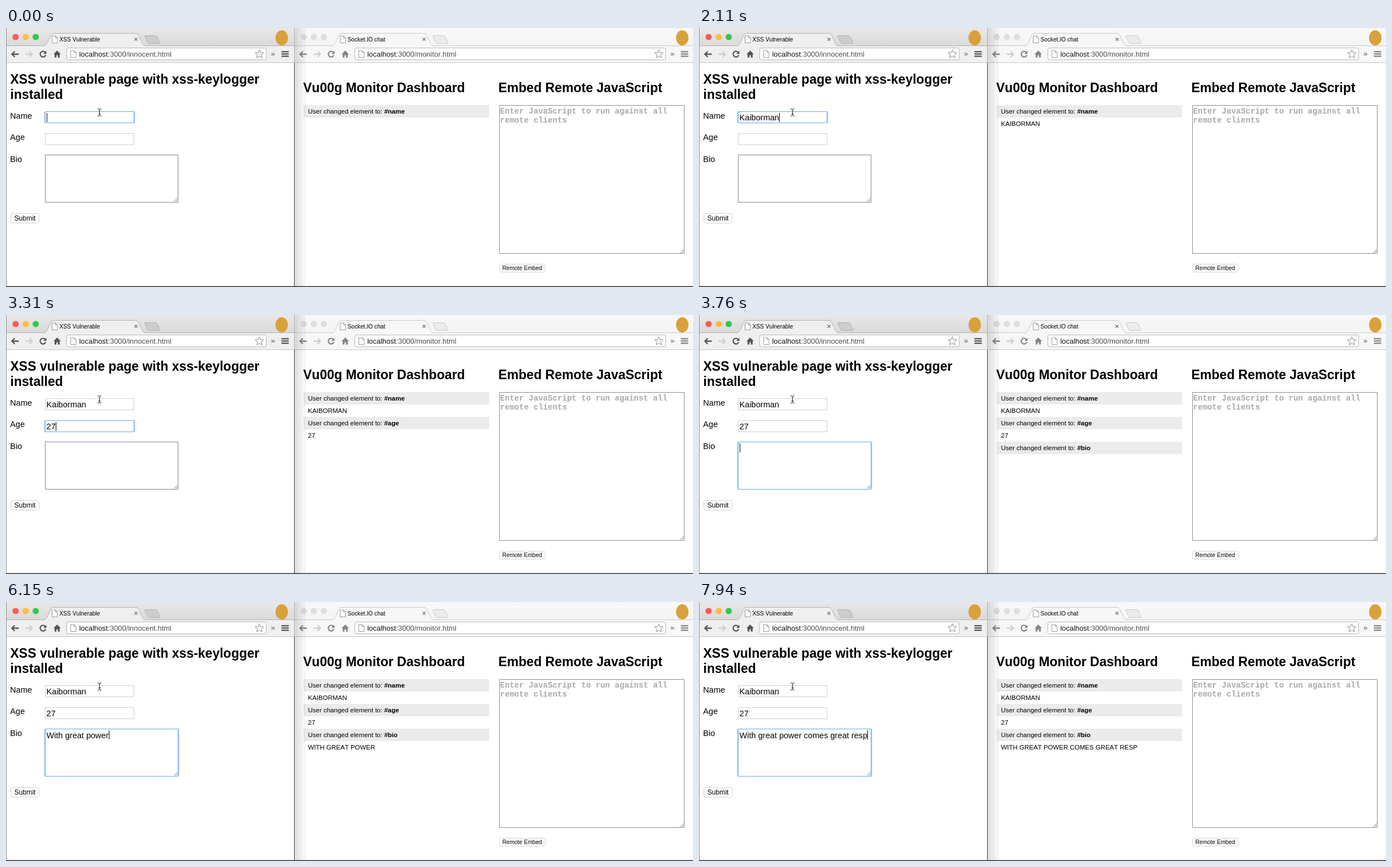
An HTML page with a canvas that plays this animation: 1216x460 px, repeating every 8000 ms.

```html
<!DOCTYPE html>
<html lang="en">
<head>
<meta charset="utf-8">
<title>Keylogger demo</title>
<style>
  html, body { margin: 0; width: 100%; height: 100%; overflow: hidden; background: #fff; }
  canvas { display: block; }
</style>
</head>
<body>
<canvas id="stage" width="1216" height="460"></canvas>
<script>
const ctx = document.getElementById('stage').getContext('2d');
const SANS = "'Liberation Sans', Arial, sans-serif";
const MONO = "'Liberation Mono', 'Courier New', monospace";
const LOOP = 8000;

const fields = [
  { id: 'name', label: 'Name', value: 'Kaiborman', x: 69.5, y: 148.5, w: 157, h: 20 },
  { id: 'age', label: 'Age', value: '27', x: 69.5, y: 187.5, w: 157, h: 20 },
  { id: 'bio', label: 'Bio', value: 'With great power comes great resp', x: 69.5, y: 225.5, w: 235, h: 84 },
];

// Typing script per field: [time, letters typed]; -1 means empty with the caret hidden.
const script = [
  [[0, 0], [150, -1], [780, 1], [930, 2], [1080, 3], [1230, 4], [1380, 5], [1530, 6], [1680, 7], [1820, 8], [2110, 9]],
  [[2260, 0], [2860, -1], [3310, 2]],
  [[3760, 0], [4360, -1], [4510, 1], [4660, 2], [4810, 3], [4960, 4], [5110, 5], [5260, 7],
   [5410, 9], [5560, 11], [5700, 12], [5850, 14], [6150, 16], [6300, 17], [6450, 19], [6600, 20],
   [6750, 22], [6890, 23], [7040, 25], [7190, 26], [7340, 28], [7490, 29], [7640, 31], [7940, 33]],
];

function text(str, x, y, size, color = '#000', weight = '', family = SANS) {
  ctx.font = `${weight} ${size}px ${family}`;
  ctx.fillStyle = color;
  ctx.fillText(str, x, y);
  return x + ctx.measureText(str).width;
}

function rect(x, y, w, h, color) {
  ctx.fillStyle = color;
  ctx.fillRect(x, y, w, h);
}

function paint(fill, stroke, width = 1) {
  if (fill) { ctx.fillStyle = fill; ctx.fill(); }
  if (stroke) { ctx.strokeStyle = stroke; ctx.lineWidth = width; ctx.stroke(); }
}

function box(x, y, w, h, r, fill, stroke, width) {
  ctx.beginPath();
  ctx.roundRect(x, y, w, h, r);
  paint(fill, stroke, width);
}

function shape(d, x, y, fill, stroke, width = 1) {
  ctx.save();
  ctx.translate(x, y);
  const path = new Path2D(d);
  if (fill) { ctx.fillStyle = fill; ctx.fill(path); }
  if (stroke) { ctx.strokeStyle = stroke; ctx.lineWidth = width; ctx.stroke(path); }
  ctx.restore();
}

function oval(x, y, rx, ry, fill) {
  ctx.beginPath();
  ctx.ellipse(x, y, rx, ry, 0, 0, 7);
  paint(fill);
}

function pageIcon(x, y) {
  shape('M-4.5-6H1.5L5-2.5V6.5H-4.5ZM1.5-6V-2.5H5', x, y, '#fff', '#999');
}

function star(x, y) {
  ctx.beginPath();
  for (let i = 0; i < 10; i++) {
    const r = i % 2 ? 3.6 : 8, a = (i * Math.PI) / 5;
    ctx.lineTo(x + r * Math.sin(a), y - r * Math.cos(a));
  }
  ctx.closePath();
  paint('#fff', '#888');
}

function grip(x, y) {
  shape('M-6 0L0-6M-3 0L0-3', x, y, null, '#777');
}

function browser(left, right, { strip, bar, newTab, edge, ink, lights, title, path, avatar }) {
  const shade = ctx.createLinearGradient(0, 0, 0, 31);
  strip.forEach((color, i) => shade.addColorStop(i, color));
  rect(left, 0, right - left, 460, '#fff');
  rect(left, 0, right - left, 31, shade);
  rect(left, 31, right - left, 30, bar);
  rect(left, 31, right - left, 1, edge);
  rect(left, 61, right - left, 1, '#c4c4c4');

  lights.forEach((color, i) => oval(left + 17 + i * 17.8, 16, 5.6, 5.6, color));
  shape('M66 32C71 31 72 29 74 24L79 13Q80.5 9.5 84 9.5H230Q233.5 9.5 235 13L240 24C242 29 243 31 248 32',
    left, 0, bar, edge);
  shape('M247 13.5H264Q266.5 13.5 267.5 16L272.5 26Q273 27.5 271 27.5H254Q251.5 27.5 250.5 25L245.5 15.5Q245 13.5 247 13.5Z',
    left, 0, newTab, edge);
  pageIcon(left + 86, 20);
  text(title, left + 94.5, 24, 10.2);
  shape('M-2.6-2.6L2.6 2.6M2.6-2.6L-2.6 2.6', left + 230, 20, null, '#666', 1.3);

  shape('M6.5 0H-5M-.5-5L-5.5 0L-.5 5', left + 16, 46.5, null, ink, 2.4);
  shape('M-6.5 0H5M.5-5L5.5 0L.5 5', left + 41, 46.5, null, '#cfcfcf', 2.4);
  shape('M4.2-2.8A5 5 0 1 0 4.8 1.5', left + 65.5, 46.5, null, ink, 2.2);
  shape('M6-6V-.5H.5Z', left + 65.5, 46.5, ink);
  shape('M0-6.5L6.5 0H4.5V6H1.3V2H-1.3V6H-4.5V0H-6.5Z', left + 90.5, 46.5, ink);

  box(left + 107.5, 35.5, right - left - 157, 21, 2.5, '#fff', '#b8b8b8');
  pageIcon(left + 119, 46);
  const end = text('localhost', left + 129.5, 50.7, 12.9, '#111');
  text(':3000/' + path, end, 50.7, 12.9, '#4c4c4c');
  star(right - 61.5, 46.5);
  text('»', right - 41, 50, 13, '#555');
  for (const y of [41, 45, 49]) rect(right - 22.5, y, 13, 2.3, ink);
  oval(avatar, 17.5, 11, 13.5, '#d9a13b');
}

function typed(field, state) {
  return field.value.slice(0, Math.max(0, state[1]));
}

function monitorPage(states) {
  text('Vu00g Monitor Dashboard', 526, 114, 23, '#000', 'bold');
  text('Embed Remote JavaScript', 871.5, 114, 23, '#000', 'bold');

  fields.forEach((field, i) => {
    const state = states[i];
    if (!state) return;
    const y = 137 + i * 44;
    rect(527, y, 328, 22, '#ebebeb');
    const end = text('User changed element to: ', 534.5, y + 14.8, 11.5);
    text('#' + field.id, end, y + 14.8, 11.5, '#000', 'bold');
    text(typed(field, state).toUpperCase(), 534.5, y + 36.8, 11.5);
  });

  box(873.5, 137.5, 327, 263, 0, '#fff', '#8c8c8c');
  text('Enter JavaScript to run against all', 874.5, 152, 14.1, '#a9a9a9', 'bold', MONO);
  text('remote clients', 874.5, 167.5, 14.1, '#a9a9a9', 'bold', MONO);
  grip(1199.5, 399.5);
  box(873.5, 419.5, 81, 14, 3, '#fff', '#d2d2d2');
  text('Remote Embed', 878.5, 430, 10.1);
}

function formPage(states) {
  text('XSS vulnerable page with xss-keylogger', 7.5, 99, 23, '#000', 'bold');
  text('installed', 7.5, 125.5, 23, '#000', 'bold');

  const focus = states.filter(Boolean).length - 1;
  fields.forEach((field, i) => {
    const { x, y, w, h, label } = field;
    const state = states[i];
    const tall = field.id === 'bio';
    const focused = i === focus;
    text(label, 7.3, 160.6 + i * 38.5, 14.6);
    if (focused) box(x - 1, y + 0.5, w + 2, h - 1, 1, null, '#a9d0f8', 2);
    box(x, y, w, h, 0, '#fff', focused ? '#64a8ee' : tall ? '#868686' : '#cfcfcf');
    if (tall) grip(303.5, 308);
    if (!state) return;
    const end = text(typed(field, state), 71.6, y + (tall ? 16 : 15.3), 14.55);
    if (focused && state[1] >= 0) rect(Math.round(end), y + 2.5, 1, 16, '#000');
  });

  box(8.5, 329.5, 50, 17, 3.5, '#fff', '#d2d2d2');
  text('Submit', 14.8, 342, 12.1);
}

function draw(now) {
  const t = now % LOOP;
  const states = script.map(steps => steps.filter(([time]) => time <= t).pop());
  ctx.fontKerning = 'none';

  browser(510, 1217, {
    strip: ['#f8f8f8', '#f4f4f4'], bar: '#f7f7f7', newTab: '#ebebeb', edge: '#c8c8c8', ink: '#858585',
    lights: ['#dedede', '#dedede', '#dedede'],
    title: 'Socket.IO chat', path: 'monitor.html', avatar: 1197,
  });
  monitorPage(states);
  for (const width of [6, 12, 19]) rect(511, 0, width, 460, 'rgba(0,0,0,.04)');

  browser(0, 510, {
    strip: ['#e8e8e8', '#dadada'], bar: '#efefef', newTab: '#cdcdcd', edge: '#b0b0b0', ink: '#555',
    lights: ['#fc5b57', '#fdbd3e', '#34c84a'],
    title: 'XSS Vulnerable', path: 'innocent.html', avatar: 488,
  });
  formPage(states);

  rect(0, 0, 1, 460, '#8a8a8a');
  rect(510, 0, 1, 62, '#aaa');
  rect(510, 62, 1, 398, '#333');
  rect(0, 458.5, 1216, 1.5, '#333');
  shape('M-3.5-6.5Q0-6.5 0-4Q0-6.5 3.5-6.5M0-4V4M-3.5 6.5Q0 6.5 0 4Q0 6.5 3.5 6.5M-2 2.5H2',
    165.5, 150, null, '#222');
  requestAnimationFrame(draw);
}
requestAnimationFrame(draw);
</script>
</body>
</html>
```
